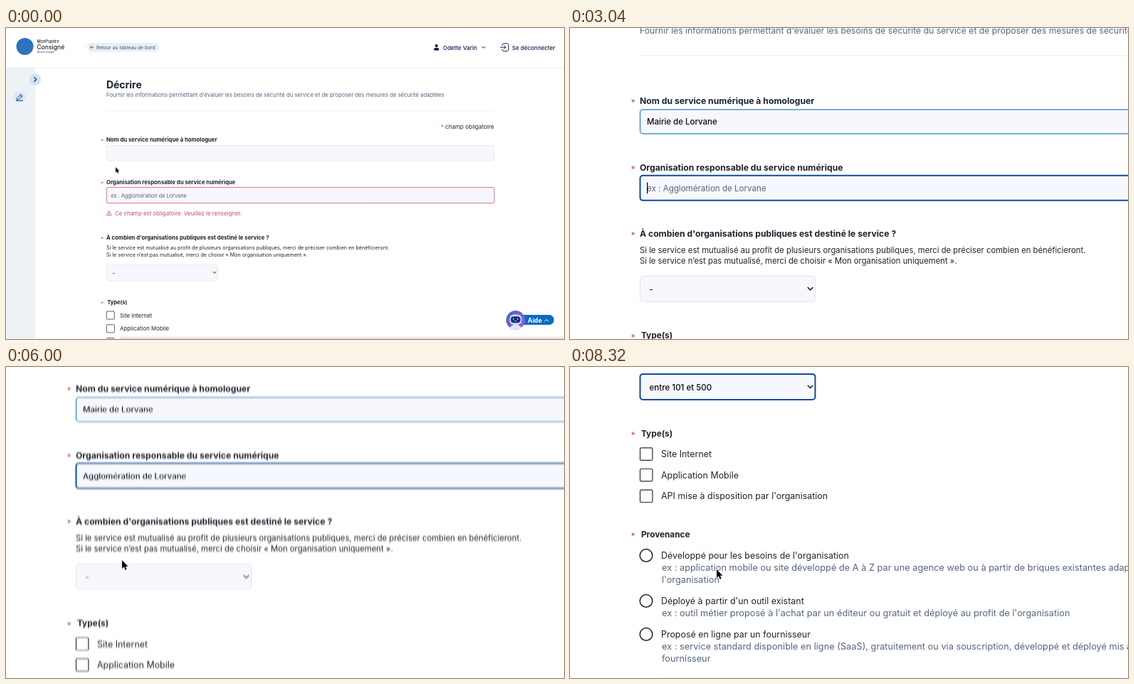
An HTML page that plays this animation: 784 px wide and 438 px high, repeating every 8.4 s.

```html
<!DOCTYPE html>
<html lang="fr">
<head>
<meta charset="utf-8">
<title>Décrire</title>
<style>
  html, body { margin: 0; width: 100%; height: 100%; overflow: hidden; background: #fff; }
  svg { display: block; width: 784px; height: 438px; }
  text { font: 400 12.2px Inter, "Open Sans", sans-serif; fill: #20242f; dominant-baseline: central; white-space: pre; }
  .title { font-size: 22px; font-weight: 700; }
  .label { font-weight: 700; }
  .group { font-size: 11.8px; font-weight: 700; }
  .star { font-size: 12.5px; fill: #cb4a6d; }
  .muted { fill: #55657f; }
  .help { font-size: 11.3px; }
  .input { font-size: 11.5px; font-weight: 500; fill: #0c0d12; }
  .hint { font-size: 11.6px; fill: #5f6470; }
  .error { font-size: 12.4px; fill: #cb4a6d; }
  .option { font-size: 12.45px; }
  .example { font-size: 12.78px; fill: #55657f; }
  .choice { font-size: 11.6px; font-weight: 500; fill: #0c0d12; }
  .nav { font-size: 8px; font-weight: 500; fill: #10194a; }
  .line { fill: none; stroke: #10194a; stroke-linecap: round; stroke-linejoin: round; }
  .field { fill: #f7f8fd; stroke: #e1e4ec; stroke-width: 1; }
  .field.bad { stroke: #cb4a6d; stroke-width: 1.2; }
  .field.focus { stroke: #0f4c96; stroke-width: 2; }
  .field.done { stroke: #2a80bd; stroke-width: 1.2; }
  .box { fill: #fff; stroke: #2a2d3a; stroke-width: 1.2; }
  .radio { fill: #fff; stroke: #1d202b; stroke-width: 1.5; }
  .caret { fill: #000; }
  #menu { filter: drop-shadow(0 8px 13px rgba(0, 0, 0, .25)); }
  #menu text { font-size: 11px; fill: #2d2d30; }
  #menu text.on { fill: #fff; }
</style>
</head>
<body>
<svg viewBox="0 0 784 438">
  <defs>
    <filter id="blur" filterUnits="userSpaceOnUse" x="-140" y="-60" width="1300" height="900">
      <feGaussianBlur id="smear" stdDeviation="0 0"/>
    </filter>
    <linearGradient id="shade" x2="0" y2="1">
      <stop stop-opacity="0"/><stop offset="1" stop-opacity=".13"/>
    </linearGradient>
    <linearGradient id="violet" x2="1" y2="1">
      <stop stop-color="#4a63c8"/><stop offset="1" stop-color="#9a62dd"/>
    </linearGradient>
  </defs>

  <g id="blurred">
    <g id="pageCam"><g transform="translate(78.73 20.32) scale(.63492)"><g id="page">
      <text class="title" x="98" y="94">Décrire</text>
      <text class="muted" x="98" y="117">Fournir les informations permettant d'évaluer les besoins de sécurité du service et de proposer des mesures de sécurité adaptées</text>
      <path d="M98 152.5H956" stroke="#e8eaee"/>
      <text x="956" y="187" text-anchor="end" style="font-size:12.8px"><tspan fill="#cb4a6d">*</tspan> champ obligatoire</text>

      <text class="star" x="85.5" y="219">*</text>
      <text class="label" x="98" y="216.5">Nom du service numérique à homologuer</text>
      <rect id="nameField" class="field" x="98.5" y="228.5" width="858" height="34" rx="4"/>
      <text id="nameText" class="input" x="108" y="246"></text>
      <rect id="nameCaret" class="caret" y="238" width="1.2" height="16"/>

      <text class="star" x="85.5" y="313">*</text>
      <text class="label" x="98" y="310.5">Organisation responsable du service numérique</text>
      <rect id="orgField" class="field" x="98.5" y="321.5" width="858" height="35" rx="4"/>
      <text id="orgHint" class="hint" x="108" y="340">ex : Agglomération de Lorvane</text>
      <text id="orgText" class="input" x="108" y="339.5"></text>
      <rect id="orgCaret" class="caret" y="331" width="1.2" height="16"/>
      <path id="spell" d="M210 345.5H256" stroke="#c8283c" stroke-width="1.6" stroke-dasharray="1.6 1.4"/>
      <g id="warning">
        <path class="line" style="stroke:#cb4a6d" stroke-width="1.2" d="M104.3 374.3L109.4 383.3H99.2ZM104.3 377.6V380M104.3 381.6V381.7"/>
        <text class="error" x="117" y="379">Ce champ est obligatoire. Veuillez le renseigner.</text>
      </g>

      <g id="lower">
        <text class="star" x="85.5" y="3">*</text>
        <text class="label" x="98" y="0">À combien d'organisations publiques est destiné le service ?</text>
        <text class="help" x="98" y="22.7">Si le service est mutualisé au profit de plusieurs organisations publiques, merci de préciser combien en bénéficieront.</text>
        <text class="help" x="98" y="38.3">Si le service n’est pas mutualisé, merci de choisir « Mon organisation uniquement ».</text>
        <rect id="selectField" class="field" x="98.5" y="59.5" width="246" height="36" rx="4"/>
        <text id="selectText" class="choice" x="111.5" y="78.5">-</text>
        <path class="line" style="stroke:#15171f" stroke-width="1.5" d="M334.3 75.8L337.6 79.1 340.9 75.8"/>

        <text class="star" x="85.5" y="146.5">*</text>
        <text class="group" x="100" y="143.5">Type(s)</text>
        <g id="checks"></g>

        <text class="star" x="85.5" y="288.5">*</text>
        <text class="group" x="100" y="285.5">Provenance</text>
        <g id="radios"></g>
      </g>
    </g></g></g>

    <g id="screenCam">
      <rect width="784" height="55.5" fill="#fff"/>
      <path d="M0 55.9H784" stroke="#e1e5ec" stroke-width=".7"/>
      <rect y="56" width="41" height="400" fill="#edf2f7"/>
      <circle cx="41" cy="72.5" r="8" fill="#d5e2f0"/>
      <path class="line" style="stroke:#0b3f8c" stroke-width="1.2" d="M39.7 69.5L42.7 72.5 39.7 75.5"/>
      <circle cx="19" cy="97" r="8.5" fill="#dbe8f4"/>
      <path class="line" style="stroke:#0b3f8c" stroke-width="1" d="M15.5 98.8L21 93.3 23.2 95.5 17.7 101H15.5ZM19.5 94.8L21.7 97M14.5 102.2H23.5"/>

      <circle cx="26.5" cy="26" r="12" fill="#2f72bd"/>
      <text x="43.5" y="19.3" style="font-size:5.6px;font-weight:500">MonPupitre</text>
      <text x="43.3" y="27" style="font-size:8.6px;font-weight:500">Consigné</text>
      <text x="43.5" y="33.6" style="font-size:3.2px">Service en ligne</text>

      <rect x="114" y="21" width="101" height="12.6" rx="6.3" fill="#e9eff6"/>
      <path class="line" style="stroke:#43536b" stroke-width=".9" d="M123 27.2H118.4M120.4 25.2L118.4 27.2 120.4 29.2"/>
      <text x="127" y="27.4" style="font-size:6.75px;fill:#43536b">Retour au tableau de bord</text>

      <circle cx="604.8" cy="25" r="2.1" fill="#10194a"/>
      <path d="M601.3 31.4V30.2Q601.3 27.8 604.8 27.8T608.3 30.2V31.4Z" fill="#10194a"/>
      <text class="nav" x="614" y="27.8">Odette Varin</text>
      <path class="line" stroke-width="1" d="M669 26.3L671.1 28.4 673.2 26.3"/>
      <path class="line" stroke-width="1" d="M697 24.5V23.5L699 21.8H704.5L706 23.3V31.2L704.5 32.7H699L697 31V30M694.5 27.2H702M699.8 25L702 27.2 699.8 29.4"/>
      <text class="nav" x="711" y="27.8">Se déconnecter</text>

      <rect x="160" y="433" width="624" height="5" fill="url(#shade)"/>
      <rect x="712" y="404" width="58" height="14" rx="7" fill="#0d6bc4"/>
      <text x="733" y="411.7" style="font-size:8.9px;font-weight:700;fill:#fff">Aide</text>
      <path class="line" style="stroke:#fff" stroke-width="1" d="M756.8 413L759.4 410.4 762 413"/>
      <circle cx="716" cy="411.3" r="13.3" fill="url(#violet)"/>
      <path d="M707.5 422Q716 413 724.5 422Q716 427 707.5 422Z" fill="#dfe6fa"/>
      <rect x="707.5" y="403.5" width="17" height="14.5" rx="6" fill="#cbdcf8"/>
      <rect x="709.3" y="406.2" width="13.4" height="9" rx="4" fill="#152a6e"/>
      <path class="line" style="stroke:#7fd6ff" stroke-width="1.5" d="M713 409.3V410.4M719 409.3V410.4"/>
      <path class="line" style="stroke:#7fd6ff" stroke-width=".8" d="M714.5 412.6Q716 413.6 717.5 412.6"/>
    </g>
  </g>

  <g id="menu">
    <rect x="92" y="124" width="247" height="236" rx="6" fill="#f4f4f6"/>
    <rect id="bar" x="97" width="237" height="18.5" rx="4" fill="#3b87f3"/>
    <path class="line" style="stroke:#2d2d30" stroke-width="1.4" d="M100 139L102.3 141.4 106 135.5"/>
    <g id="items"></g>
  </g>
  <circle id="ring" cx="183" cy="149" r="18.5" fill="none" stroke="#111" stroke-width="1.3"/>
  <path id="pointer" d="M0 0V7.5L1.8 6 3 8.8 4.2 8.3 3.1 5.6H5.4Z" stroke="#fff" stroke-width=".6" paint-order="stroke"/>
</svg>

<script>
const LOOP = 8400, ROW = 18.9, ZOOM = .575, CAMERA_MAX = 214;
const $ = id => document.getElementById(id);
const clamp = (v, lo, hi) => Math.min(hi, Math.max(lo, v));
const show = (id, on) => $(id).style.display = on ? '' : 'none';
const move = (id, value) => $(id).setAttribute('transform', value);
const label = (cls, x, y, s) => `<text class="${cls}" x="${x}" y="${y}">${s}</text>`;

$('checks').innerHTML = ['Site Internet', 'Application Mobile', "API mise à disposition par l'organisation"]
  .map((s, i) => {
    const y = 172.3 + i * 29.6;
    return `<rect class="box" x="98.5" y="${y - 8.8}" width="17.4" height="17.4" rx="1.5"/>` + label('option', 128, y, s);
  }).join('');

$('radios').innerHTML = [
  [315, "Développé pour les besoins de l'organisation",
    'ex : application mobile ou site développé de A à Z par une agence web ou à partir de briques existantes adaptées pour', "l'organisation"],
  [379, "Déployé à partir d'un outil existant",
    "ex : outil métier proposé à l'achat par un éditeur ou gratuit et déployé au profit de l'organisation"],
  [426, 'Proposé en ligne par un fournisseur',
    'ex : service standard disponible en ligne (SaaS), gratuitement ou via souscription, développé et déployé mis à disposition par le', 'fournisseur']
].map(([y, name, ...lines]) =>
  `<circle class="radio" cx="107" cy="${y}" r="8.8"/>` + label('option', 128, y, name) +
  lines.map((s, i) => label('example', 129, y + 17.4 + i * 17, s)).join('')
).join('');

const choices = ['-', 'Mon organisation uniquement', '2', '3', '4', 'entre 5 et 10', 'entre 11 et 50', 'entre 51 et 100',
  'entre 101 et 500', 'entre 501 et 1 000', 'entre 1 001 et 5 000', 'plus de 5 000'];
$('items').innerHTML = choices.map((s, i) => label('', 112, 138.3 + i * ROW, s)).join('');
const rows = [...$('items').children];

// Critically damped spring from 0 to 1, starting at a given time
const spring = (t, start, speed) => {
  const u = Math.max(0, t - start) / 1000 * speed;
  return 1 - (1 + u) * Math.exp(-u);
};
const scrollAt = t => 121.5 * spring(t, 2700, 13) + 222 * spring(t, 5885, 9.2) + 110 * spring(t, 7720, 13);

// time, x, y of the pointer tip
const path = [[80, 154, 196], [800, 119, 248], [5360, 120, 126], [5840, 163, 266], [6000, 163, 272],
  [6500, 183, 149], [7000, 183, 149], [7450, 184, 290], [7720, 184, 290], [8250, 206, 285]];
function pointerAt(t) {
  const i = path.findIndex(k => k[0] > t);
  if (i === 0) return path[0].slice(1);
  if (i < 0) return path[path.length - 1].slice(1);
  const [t0, x0, y0] = path[i - 1], [t1, x1, y1] = path[i];
  const u = (t - t0) / (t1 - t0), e = u * u * (3 - 2 * u);
  return [x0 + (x1 - x0) * e, y0 + (y1 - y0) * e];
}

const typed = (t, start) => Math.max(0, Math.floor((t - start) / 70));
function type(id, text, count, caretOn) {
  const el = $(id + 'Text');
  el.textContent = text.slice(0, count);
  $(id + 'Caret').setAttribute('x', 108 + (count ? el.getComputedTextLength() : 0));
  show(id + 'Caret', caretOn);
}
const state = (id, name) => $(id).setAttribute('class', 'field ' + name);

function draw(t) {
  const zoom = spring(t, 80, 9.2), scale = 1 + ZOOM * zoom, shift = scrollAt(t);
  const cam = Math.min(shift, CAMERA_MAX);
  const view = `translate(${-124 * zoom} ${-32 * zoom - cam}) scale(${scale})`;
  move('pageCam', view);
  move('screenCam', view);
  move('page', `translate(0 ${cam - shift})`);

  const smear = Math.min(1.4, (shift - scrollAt(t - 16)) * .1);
  $('smear').setAttribute('stdDeviation', `0 ${smear}`);
  if (smear > .1) $('blurred').setAttribute('filter', 'url(#blur)');
  else $('blurred').removeAttribute('filter');

  const onOrg = t >= 2740, left = t >= 6840, chosen = t >= 7720;
  state('nameField', onOrg ? 'done' : t >= 700 ? 'focus' : '');
  state('orgField', left ? 'done' : onOrg ? 'focus' : 'bad');
  state('selectField', chosen ? 'focus' : '');
  $('selectText').textContent = choices[chosen ? 8 : 0];
  show('warning', !onOrg);
  move('lower', `translate(0 ${onOrg ? 403.5 : 433})`);

  const orgCount = Math.min(20, typed(t, 3425)) + Math.min(4, typed(t, 4970));
  type('name', 'Mairie de Lorvane', typed(t, 900), t >= 700 && !onOrg);
  type('org', 'Agglomération de Lorvane', orgCount, onOrg && t < 5700);
  show('orgHint', !orgCount);
  show('spell', t >= 6050 && !left);

  const [x, y] = pointerAt(t);
  move('pointer', `translate(${x} ${y}) scale(${scale})`);
  show('pointer', t < 900 || t >= 5360);
  show('ring', t >= 6740 && t < 6880);

  const open = t >= 6840 && t < 7711;
  show('menu', open);
  if (open) {
    const active = clamp(Math.floor((y - 128.5) / ROW), 0, choices.length - 1);
    $('menu').style.opacity = clamp((7711 - t) / 125, 0, 1);
    $('bar').setAttribute('y', 129 + active * ROW);
    rows.forEach((row, i) => row.setAttribute('class', i === active ? 'on' : ''));
  }
}

const begin = performance.now();
function tick() {
  draw((performance.now() - begin) % LOOP);
  requestAnimationFrame(tick);
}
tick();
</script>
</body>
</html>
```
